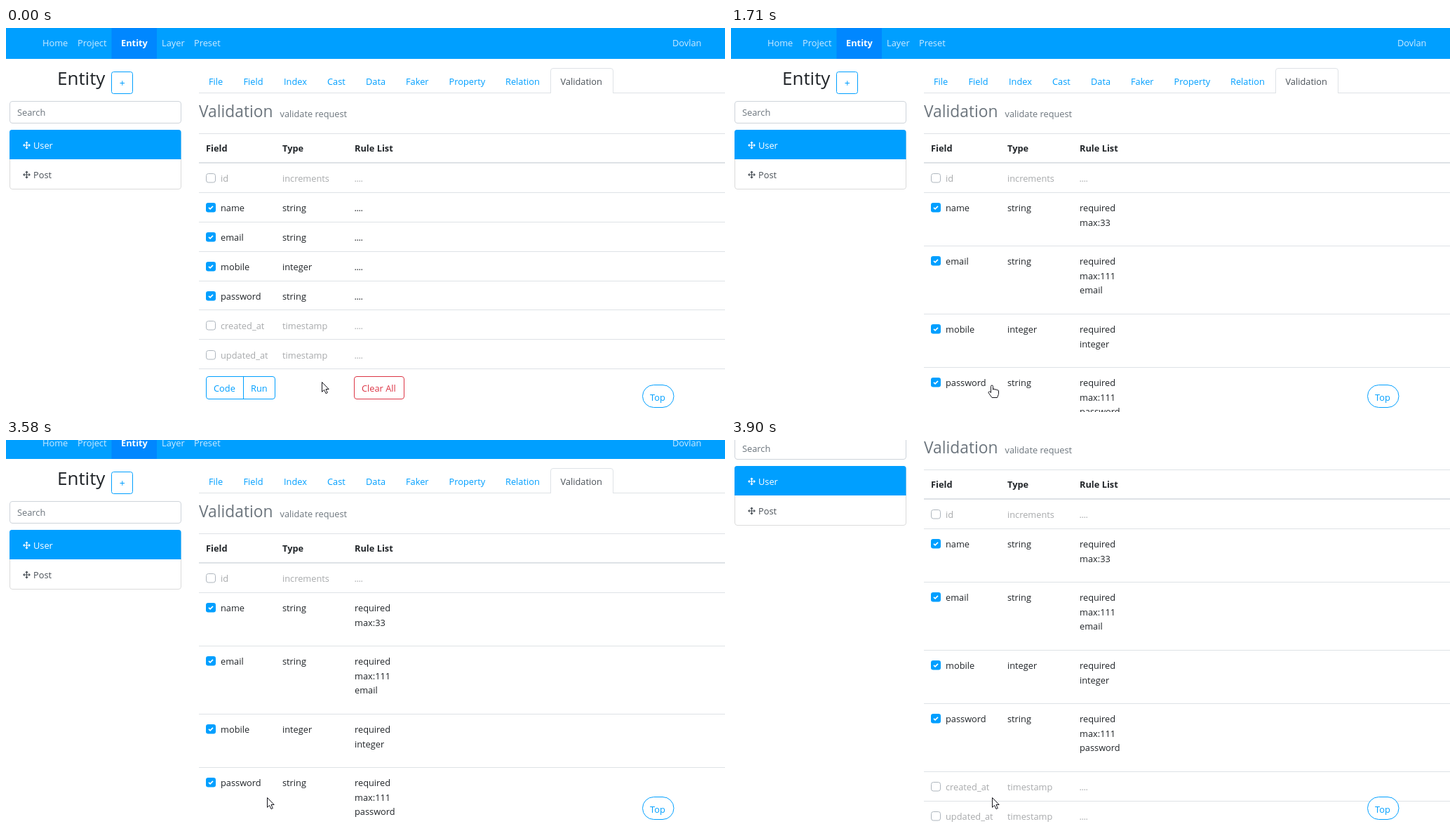
These frames come from a looping animation (1025 by 547 pixels, 5.14 s). An HTML page:

```html
<!DOCTYPE html>
<html lang="en">
<head>
<meta charset="utf-8">
<title>Entity validation</title>
<style>
  html, body { margin: 0; width: 100%; height: 100%; overflow: hidden; background: #fff; }
  svg { display: block; width: 1025px; height: 547px; }
  text { font: 12.8px "Open Sans", "Noto Sans", sans-serif; fill: #212529; white-space: pre; }
  .bold { font-weight: 700; }
  .blue { fill: #009fff; }
  .white { fill: #fff; }
  .pale { fill: #cdebff; }
  .gray { fill: #6c757d; }
  .slate { fill: #495057; }
  .muted { fill: #a8aaac; }
  .red { fill: #dc3545; }
  .h1 { font-size: 26px; }
  .h2 { font-size: 22.8px; }
  .dots { letter-spacing: -.4px; }
  .line { fill: #dee2e6; }
  .box { fill: #fff; stroke: #ced4da; }
  .btn { fill: none; stroke: #009fff; }
  .pointer { fill: #fff; stroke: #15151c; stroke-linejoin: round; }

  #page, #cursor, #before, #after, #arrow, #hand, #runBox, #runText {
    animation: 5140ms step-end infinite;
  }
  #page { animation-name: scroll; }
  #cursor { animation-name: move; }
  #before { animation-name: leave; }
  #after { animation-name: enter; }
  #arrow { animation-name: arrow; }
  #hand { animation-name: hand; }
  #runBox { animation-name: fill; }
  #runText { animation-name: ink; }

  @keyframes scroll {
    0% { transform: translateY(0); }
    68.093% { transform: translateY(-1px); }
    69.649% { transform: translateY(-17px); }
    71.206% { transform: translateY(-46px); }
    72.762% { transform: translateY(-75px); }
    74.319% { transform: translateY(-96px); }
    75.875%, 100% { transform: translateY(-108px); }
  }
  @keyframes move {
    0% { transform: translate(450px, 504px); }
    14.786% { transform: translate(447px, 504px); }
    16.342% { transform: translate(437px, 504px); }
    17.898% { transform: translate(421px, 505px); }
    19.455% { transform: translate(404px, 506px); }
    21.011% { transform: translate(390px, 506px); }
    22.568% { transform: translate(379px, 507px); }
    24.124%, 100% { transform: translate(372px, 509px); }
  }
  @keyframes leave {
    0% { visibility: visible; }
    33.268%, 100% { visibility: hidden; }
  }
  @keyframes enter {
    0% { visibility: hidden; }
    33.268%, 100% { visibility: visible; }
  }
  @keyframes arrow {
    0% { visibility: visible; }
    22.568% { visibility: hidden; }
    34.824%, 100% { visibility: visible; }
  }
  @keyframes hand {
    0% { visibility: hidden; }
    22.568% { visibility: visible; }
    34.824%, 100% { visibility: hidden; }
  }
  @keyframes fill {
    0% { fill: #fff; }
    22.568% { fill: #e6f5ff; }
    24.124% { fill: #1faaff; }
    25.68%, 100% { fill: #009fff; }
  }
  @keyframes ink {
    0% { fill: #009fff; }
    22.568% { fill: #17a8ff; }
    24.124% { fill: #e0f3ff; }
    25.68%, 100% { fill: #fff; }
  }
</style>
</head>
<body>
<svg viewBox="0 0 1025 547">
  <defs>
    <path id="drag" fill="none" stroke-width="1.2"
      d="M-4.6 0H4.6M0-4.6V4.6M-3-1.6L-4.6 0L-3 1.6M3-1.6L4.6 0L3 1.6M-1.6-3L0-4.6L1.6-3M-1.6 3L0 4.6L1.6 3"/>
  </defs>
  <g id="page">
    <rect class="blue" width="1025" height="44"/>
    <rect x="150.5" width="64.5" height="44" fill="#0087ff"/>
    <g id="labels"></g>

    <rect class="btn" x="150.5" y="62.5" width="30" height="31" rx="3"/>
    <path class="btn" d="M162.5 78.5H169M165.75 75.25V81.75"/>
    <rect class="box" x="5.5" y="104.5" width="244" height="31" rx="3.5"/>
    <text class="gray" x="16" y="125">Search</text>

    <rect x="5.5" y="145.5" width="244" height="84" rx="3.5" fill="#fff" stroke="#dbdbdb"/>
    <path class="blue" d="M5 187V148.5a3.5 3.5 0 0 1 3.5-3.5H246a3.5 3.5 0 0 1 3.5 3.5V187Z"/>
    <use href="#drag" x="29.5" y="167" stroke="#fff"/>
    <use href="#drag" x="29.5" y="209" stroke="#495057"/>
    <text class="white" x="39" y="172">User</text>
    <text class="slate" x="39" y="214">Post</text>

    <rect class="line" x="275" y="92" width="750" height="1"/>
    <path d="M776.5 93V61a3.5 3.5 0 0 1 3.5-3.5H862a3.5 3.5 0 0 1 3.5 3.5V93" fill="#fff" stroke="#dee2e6"/>
    <text class="slate" x="790.5" y="81">Validation</text>

    <rect class="line" x="275" y="150" width="750" height="1"/>
    <rect class="line" x="275" y="191" width="750" height="2"/>

    <g id="before">
      <g id="shortRows"></g>
      <rect id="runBox" x="338.5" y="497" width="44.5" height="31" rx="3"/>
      <rect class="btn" x="285.5" y="496.5" width="98" height="32" rx="3.5"/>
      <path class="btn" d="M338.5 497V528"/>
      <text class="blue" x="296" y="518">Code</text>
      <text id="runText" x="349" y="518">Run</text>
      <rect x="496.5" y="496.5" width="71" height="32" rx="3.5" fill="none" stroke="#dc3545"/>
      <text class="red" x="507" y="518">Clear All</text>
    </g>
    <g id="after"></g>
  </g>

  <rect x="907.5" y="508.5" width="44.5" height="32" rx="16" fill="#fff" stroke="#009fff"/>
  <text class="blue" x="918" y="531">Top</text>

  <g id="cursor">
    <path id="arrow" class="pointer" d="M.5.5V14.3L3.6 11.4L6 16.6L8.3 15.6L6 10.5H10.2Z"/>
    <path id="hand" class="pointer" d="M-1.5 9V1.5a1.5 1.5 0 0 1 3 0V6.3a1.4 1.4 0 0 1 2.8.3a1.4 1.4 0 0 1 2.7.6a1.4 1.4 0 0 1 2.5.8V12.5L7.5 17.5H0L-4.8 10.8a1.4 1.4 0 0 1 2-1.8L-1.5 10.5Z"/>
  </g>
</svg>
<script>
  const byId = id => document.getElementById(id);
  const text = (x, y, str, cls = "") => `<text class="${cls}" x="${x}" y="${y}">${str}</text>`;

  const labels = [
    [26, "pale", { 52: "Home", 102: "Project", 222: "Layer", 268: "Preset", 950: "Dovlan" }],
    [26, "white bold", { 164: "Entity" }],
    [81, "h1", { 73: "Entity" }],
    [81, "blue", { 289: "File", 338.5: "Field", 396: "Index", 458: "Cast", 513: "Data",
                   570: "Faker", 631.5: "Property", 712: "Relation" }],
    [127, "gray h2", { 275: "Validation" }],
    [127, "gray", { 390.5: "validate request" }],
    [176, "bold", { 285: "Field", 394: "Type", 497: "Rule List" }]
  ];
  byId("labels").innerHTML = labels.map(([y, cls, items]) =>
    Object.entries(items).map(([x, str]) => text(x, y, str, cls)).join("")).join("");

  const fields = [
    ["id", "increments"],
    ["name", "string", ["required", "max:33"]],
    ["email", "string", ["required", "max:111", "email"]],
    ["mobile", "integer", ["required", "integer"]],
    ["password", "string", ["required", "max:111", "password"]],
    ["created_at", "timestamp"],
    ["updated_at", "timestamp"]
  ];
  const lineHeight = 20.55;

  function checkbox(y, on) {
    return on
      ? `<rect class="blue" x="285" y="${y}" width="14" height="13.5" rx="3.2"/>
         <path d="M289 ${y + 6.8}l2.1 2.1l3.9-4.1" fill="none" stroke="#fff" stroke-width="1.7"/>`
      : `<rect x="285.5" y="${y + .5}" width="13" height="12.5" rx="3" fill="#fff" stroke="#adb5bd"/>`;
  }

  function rows(open) {
    let top = 192.5;
    return fields.map(([name, type, rules]) => {
      const base = Math.round(top + 26.7);
      const tone = rules ? "" : "muted";
      const list = open && rules;
      const cells = list
        ? rules.map((rule, i) => text(497, Math.round(base + i * lineHeight), rule)).join("")
        : text(496.5, base, "....", tone + " dots");
      top += list ? 35.1 + rules.length * lineHeight : 41.9;
      return checkbox(base - 12, rules) + text(306, base, name, tone) + text(394, base, type, tone) +
        cells + `<rect class="line" x="275" y="${Math.floor(top)}" width="750" height="1"/>`;
    }).join("");
  }
  byId("shortRows").innerHTML = rows(false);
  byId("after").innerHTML = rows(true);
</script>
</body>
</html>
```
